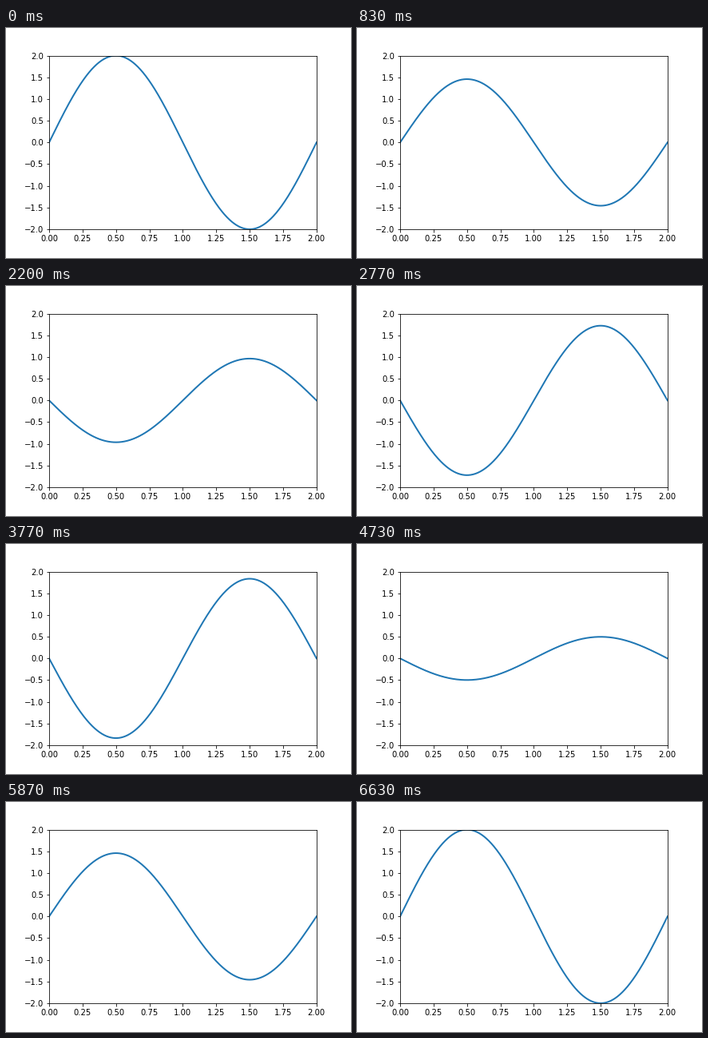
A matplotlib script for the animation above (6660 ms loop, 432 by 288 pixels).

```python
import numpy as np
import matplotlib.pyplot as plt
from matplotlib.animation import FuncAnimation

FRAMES = 200
LOOP_MS = 6660
AMPLITUDE = 2

plt.rcParams["font.family"] = "DejaVu Sans"

fig, ax = plt.subplots(figsize=(6, 4), dpi=72, facecolor="white")
fig.subplots_adjust(left=0.125, right=0.9, bottom=0.125, top=0.88)
ax.set_xlim(0, 2)
ax.set_ylim(-2, 2)

x = np.linspace(0, 2, 1000)
line, = ax.plot([], [], lw=2, color="#1f77b4")


def update(i):
    """Standing wave: one full period over the loop."""
    phase = 2 * np.pi * i / FRAMES
    line.set_data(x, AMPLITUDE * np.sin(np.pi * x) * np.cos(phase))
    return line,


def init():
    return update(0)


anim = FuncAnimation(fig, update, frames=FRAMES, init_func=init,
                     interval=LOOP_MS / FRAMES, repeat=True,
                     repeat_delay=0, blit=False)

plt.show()
```
